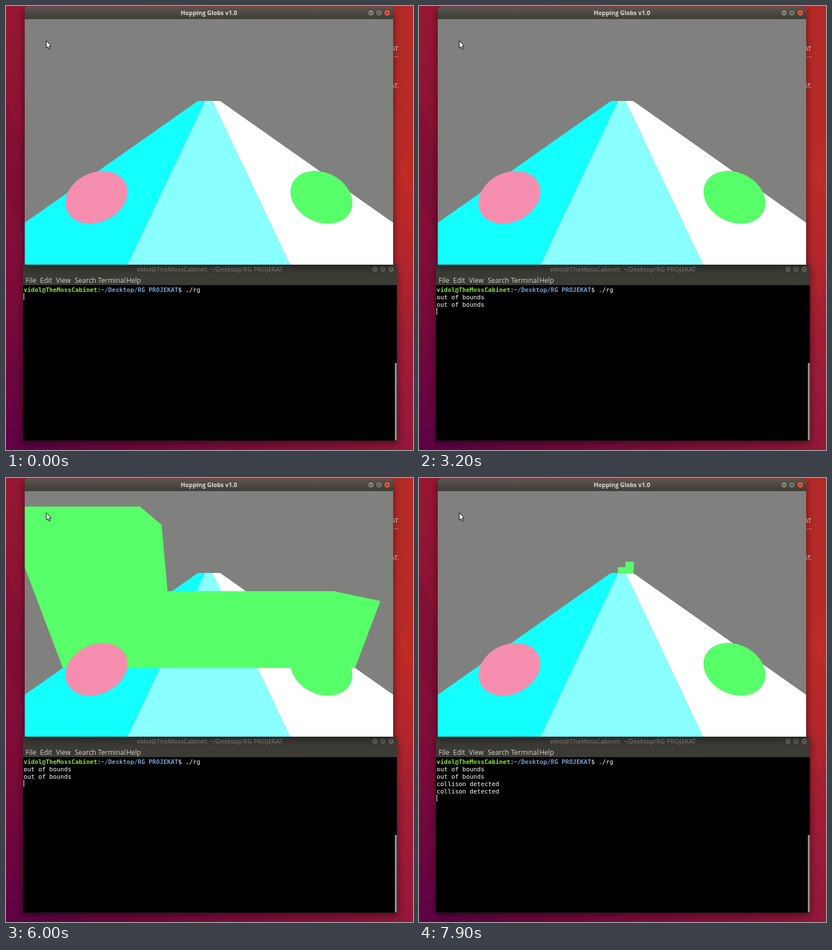
Animation of 717 by 781 pixels, one loop 8 s. Source, as an HTML page with a canvas:

```html
<!DOCTYPE html>
<html lang="en">
<head>
<meta charset="utf-8">
<title>Hopping Globs</title>
<style>
  html, body { margin: 0; width: 100%; height: 100%; overflow: hidden; background: #7a0c3a; }
  canvas { display: block; }
</style>
</head>
<body>
<canvas id="stage" width="717" height="781"></canvas>
<script>
const ctx = document.getElementById('stage').getContext('2d');
const LOOP = 8000, STEP = 100;
const MONO = '"DejaVu Sans Mono", monospace';
const SANS = '"Open Sans", "Noto Sans", sans-serif';
const GREEN = '#57ff69', PINK = '#f58eae';
const USER = 'vidol@TheMossCabinet', FOLDER = '~/Desktop/RG PROJEKAT';

// Camera one unit above the road, pitched down; one lane is one unit wide.
const VIEW = { x: 33, y: 23, w: 649, h: 432, cx: 357.5, cy: 239 };
const FOCAL = 257.4, PITCH = Math.atan(1 / 3);
const COS = Math.cos(PITCH), SIN = Math.sin(PITCH);
const ROAD_END = 20.5, BALL_R = 0.2, BALL_Z = 1, BLOCK_H = 0.7, BLOCK_DEPTH = 0.5;

// Blocks per lane (0 to 2 high) and [time, distance] keys.
const obstacles = [
  { from: 1200, to: 3200, lanes: [1, 2, 0], path: [[1200, 20.2], [1800, 14.47], [2000, 12.5]] },
  { from: 4500, to: 7000, lanes: [2, 1, 1],
    path: [[4500, 18.8], [5000, 13.47], [5300, 10.36], [5700, 5.48], [6000, 1.25], [6200, 1.25], [6300, 1]] },
  { from: 7900, to: 8000, lanes: [0, 1, 2], path: [[7900, 20]] }
];
const pinkPath = [[1500, 0.9], [1900, 1.3], [3100, 1.3], [3200, 0.9]];
const greenPath = [[1300, 0.9], [1900, 1.5], [3100, 1.5], [3200, 0.9]];
const output = [[2000, 'out of bounds'], [2000, 'out of bounds'],
                [6300, 'collison detected'], [6300, 'collison detected']];

function valueAt(path, t) {
  if (t <= path[0][0]) return path[0][1];
  for (let i = 1; i < path.length; i++) {
    const [t0, a] = path[i - 1], [t1, b] = path[i];
    if (t <= t1) return a + (b - a) * (t - t0) / (t1 - t0);
  }
  return path[path.length - 1][1];
}

function project(x, height, z) {
  const drop = 1 - height, depth = z * COS + drop * SIN;
  return [VIEW.cx + FOCAL * x / depth, VIEW.cy + FOCAL * (drop * COS - z * SIN) / depth];
}

function addPolygon(points) {
  points.forEach(([x, y], i) => i ? ctx.lineTo(x, y) : ctx.moveTo(x, y));
  ctx.closePath();
}

function fillPolygon(points, color) {
  ctx.fillStyle = color;
  ctx.beginPath();
  addPolygon(points);
  ctx.fill();
}

function rect(x, y, w, h, color) {
  ctx.fillStyle = color;
  ctx.fillRect(x, y, w, h);
}

function text(str, x, y, font, color, align = 'left') {
  ctx.font = font;
  ctx.textAlign = align;
  ctx.fillStyle = color;
  ctx.fillText(str, x, y);
}

function verticalFade(y0, y1, ...colors) {
  const fade = ctx.createLinearGradient(0, y0, 0, y1);
  colors.forEach((c, i) => fade.addColorStop(i / (colors.length - 1), c));
  return fade;
}

function drawRoad() {
  ['#14ffff', '#8affff', '#ffffff'].forEach((color, lane) => {
    const l = lane - 1.5, r = lane - 0.5;
    fillPolygon([project(l, 0, ROAD_END), project(r, 0, ROAD_END),
                 project(r, 0, 0.4), project(l, 0, 0.4)], color);
  });
}

function drawBlock(lane, height, z) {
  const corners = [];
  for (let i = 0; i < 8; i++)
    corners.push(project(lane - 1.5 + (i & 1), i & 2 ? height : 0, z + (i & 4 ? BLOCK_DEPTH : 0)));
  ctx.strokeStyle = GREEN;
  ctx.lineWidth = 0.5;
  for (const face of ['4576', '0264', '1375', '0154', '2376', '0132']) {
    fillPolygon([...face].map(i => corners[i]), GREEN);
    ctx.stroke();
  }
}

// A sphere as stacked discs, cut off where it passes behind the block front.
function drawBall(x, color, limit) {
  const slices = 80, sides = 48;
  ctx.fillStyle = color;
  ctx.beginPath();
  for (let i = 1; i < slices; i++) {
    const a = Math.PI * i / slices, z = BALL_Z - BALL_R * Math.cos(a);
    if (z > limit + 1e-6) break;
    const r = BALL_R * Math.sin(a), disc = [];
    for (let k = 0; k < sides; k++) {
      const b = 2 * Math.PI * k / sides;
      disc.push(project(x + r * Math.cos(b), BALL_R + r * Math.sin(b), z));
    }
    addPolygon(disc);
  }
  ctx.fill();
}

function drawGame(t) {
  ctx.save();
  ctx.beginPath();
  ctx.rect(VIEW.x, VIEW.y, VIEW.w, VIEW.h);
  ctx.clip();
  rect(VIEW.x, VIEW.y, VIEW.w, VIEW.h, '#80807e');
  drawRoad();
  const obstacle = obstacles.find(o => t >= o.from && t < o.to);
  const front = obstacle ? valueAt(obstacle.path, t) : Infinity;
  if (obstacle) obstacle.lanes.forEach((n, lane) => n && drawBlock(lane, n * BLOCK_H, front));
  drawBall(-valueAt(pinkPath, t), PINK, front);
  drawBall(valueAt(greenPath, t), GREEN, front);
  ctx.restore();
}

function drawDesktop() {
  const fade = ctx.createLinearGradient(0, 781, 717, 100);
  [[0, '#5c0045'], [0.25, '#7a0b3b'], [0.6, '#9c1a38'], [0.85, '#b92a27'], [1, '#b52a27']]
    .forEach(([at, color]) => fade.addColorStop(at, color));
  rect(0, 0, 717, 781, fade);
  rect(0, 0, 30, 781, verticalFade(0, 781, '#981732', '#8a1135', '#7b0b38', '#5f0145'));
  fillPolygon([[0, 165], [30, 245], [30, 400], [0, 330]], 'rgba(70,0,40,.12)');
  fillPolygon([[689, 300], [717, 220], [717, 480], [689, 560]], 'rgba(220,50,30,.12)');
  ctx.strokeStyle = 'rgba(230,80,50,.3)';
  ctx.lineWidth = 1;
  for (const [y0, y1] of [[175, 115], [262, 330], [560, 530]]) {
    ctx.beginPath();
    ctx.moveTo(689, y0);
    ctx.lineTo(717, y1);
    ctx.stroke();
  }
  text('AT', 691, 79, '11px ' + SANS, '#eee', 'right');
  text('...', 692, 90, '11px ' + SANS, '#eee', 'right');
  text('AT.', 692, 144, '11px ' + SANS, '#eee', 'right');
  text('~~~~', 7, 738, '8px ' + SANS, 'rgba(190,100,150,.5)');
  text('~~~~', 200, 784, '8px ' + SANS, 'rgba(190,100,150,.5)');
}

function shadowedPanel(x, y, w, h) {
  ctx.save();
  ctx.shadowColor = 'rgba(0,0,0,.5)';
  ctx.shadowBlur = 14;
  ctx.shadowOffsetY = 4;
  rect(x, y, w, h, '#3c3b37');
  ctx.restore();
}

function drawButtons(xs, y, fill, lastFill, ink) {
  xs.forEach((x, i) => {
    ctx.beginPath();
    ctx.arc(x, y, 5.4, 0, 7);
    ctx.fillStyle = i === 2 ? lastFill : fill;
    ctx.fill();
    ctx.strokeStyle = '#302f2b';
    ctx.lineWidth = 0.8;
    ctx.stroke();
    ctx.strokeStyle = ink;
    ctx.lineWidth = 1;
    ctx.beginPath();
    if (i === 0) { ctx.moveTo(x - 2.5, y + 0.5); ctx.lineTo(x + 2.5, y + 0.5); }
    if (i === 1) ctx.rect(x - 2, y - 2, 4, 4);
    if (i === 2) {
      ctx.moveTo(x - 2, y - 2); ctx.lineTo(x + 2, y + 2);
      ctx.moveTo(x + 2, y - 2); ctx.lineTo(x - 2, y + 2);
    }
    ctx.stroke();
  });
}

function drawTerminal(t) {
  shadowedPanel(30, 455, 658.5, 309.5);
  rect(30, 455, 658.5, 36, '#3b3a35');
  text(USER + ': ' + FOLDER, 359, 467, '600 11px ' + SANS, '#7e7c74', 'center');
  drawButtons([650, 664, 678.5], 463, '#67655d', '#67655d', '#3b3a35');
  const menu = { File: 34.5, Edit: 60, View: 88, Search: 121, Terminal: 162, Help: 212 };
  for (const name in menu) text(name, menu[name], 487, '12px ' + SANS, '#d5d2c9');

  rect(30, 491, 658.5, 273.5, '#000');
  rect(685, 628, 3.5, 136, '#908f8b');

  const size = 10.77, left = 31, pitch = 13, base = 502.5;
  let x = left;
  for (const [str, color, weight] of [[USER, '#8ae234', 'bold '], [':', '#fff', ''],
                                     [FOLDER, '#729fcf', 'bold '], ['$ ./rg', '#fff', '']]) {
    text(str, x, base, weight + size + 'px ' + MONO, color);
    x += ctx.measureText(str).width;
  }
  const lines = output.filter(([at]) => t >= at);
  lines.forEach(([, str], i) => text(str, left, base + pitch * (i + 1), size + 'px ' + MONO, '#fff'));
  rect(31, 505 + pitch * lines.length, 1, 12, '#fff');
}

function drawWindow(t) {
  shadowedPanel(33, 2, 649, 453);
  ctx.fillStyle = verticalFade(1, 23, '#5a5850', '#3d3c37');
  ctx.beginPath();
  ctx.roundRect(33, 1, 649, 22, [5, 5, 0, 0]);
  ctx.fill();
  text('Hopping Globs v1.0', 357.5, 16, 'bold 10.5px ' + SANS, '#e0dcd3', 'center');
  drawButtons([643, 657, 671.5], 12, '#858278', '#e9573a', '#3b3a35');
  drawGame(t);
}

function drawPointer() {
  const outline = [[71, 61], [71, 74], [74, 71.5], [76, 76], [78, 75], [76, 70.8], [79.5, 70.5]];
  fillPolygon(outline, '#fff');
  ctx.strokeStyle = '#000';
  ctx.lineWidth = 1;
  ctx.stroke();
}

let shown = -1;
function frame(now) {
  const t = Math.floor(now % LOOP / STEP) * STEP;
  if (t !== shown) {
    shown = t;
    drawDesktop();
    drawTerminal(t);
    drawWindow(t);
    drawPointer();
  }
  requestAnimationFrame(frame);
}
frame(performance.now());
</script>
</body>
</html>
```
